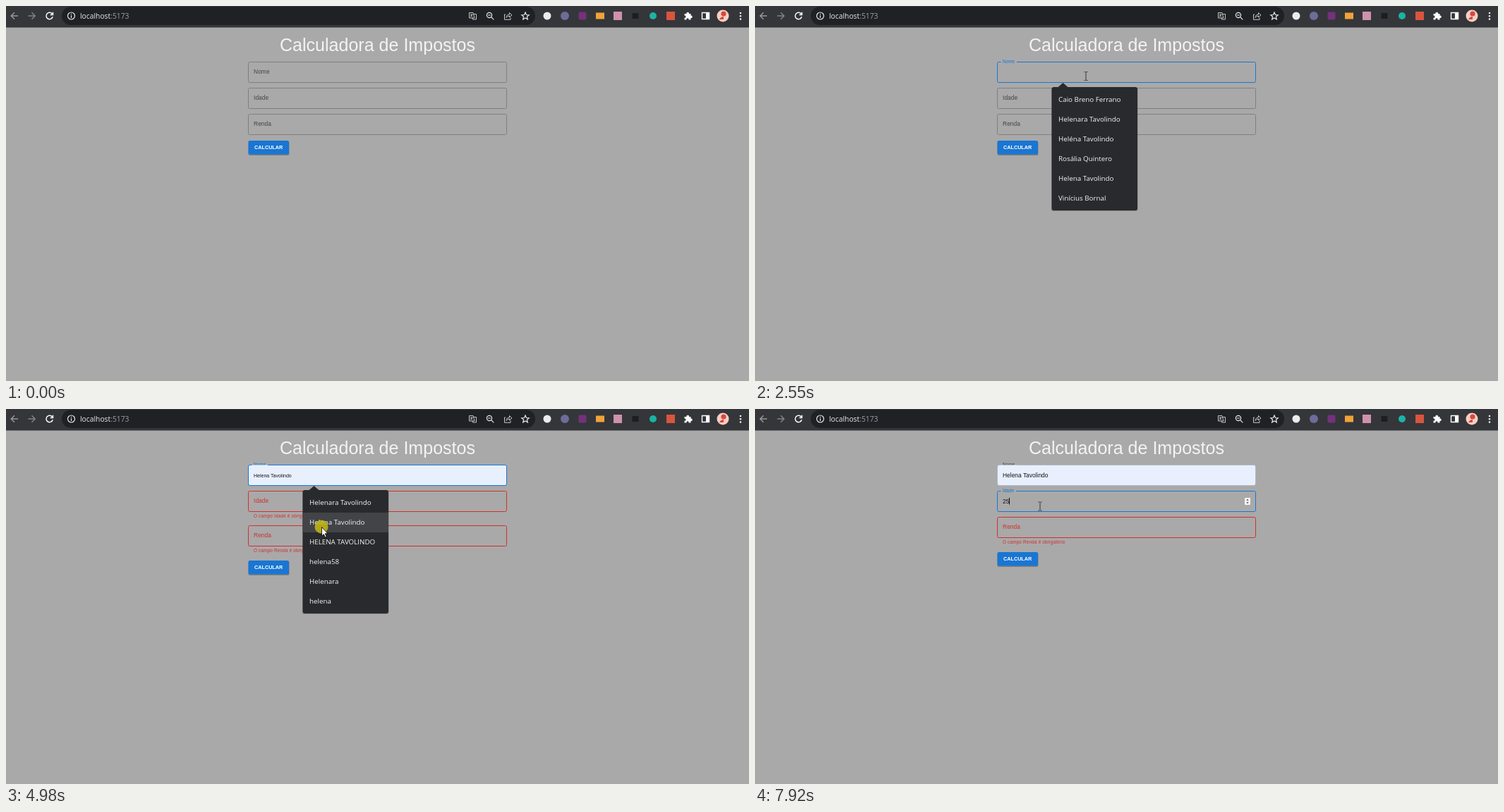
An HTML page for the animation above (8000 ms loop, 1053 by 532 pixels).

```html
<!DOCTYPE html>
<html lang="pt">
<head>
<meta charset="utf-8">
<title>Calculadora de Impostos</title>
<style>
html, body { margin: 0; width: 100%; height: 100%; overflow: hidden; background: #a9a9a9; }
svg { display: block; }
text { white-space: pre; font-family: "Liberation Sans", Arial, sans-serif; }
.ui { font-family: "Open Sans", "Noto Sans", sans-serif; }
.line { fill: none; stroke: #e8eaed; stroke-width: 1.2; }
</style>
</head>
<body>
<svg width="1053" height="532" viewBox="0 0 1053 532">
  <rect width="1053" height="532" fill="#a9a9a9"/>
  <rect width="1053" height="30.5" fill="#35363a"/>
  <rect x="79" y="1" width="671" height="26" rx="13" fill="#202124"/>
  <g class="line">
    <g stroke-width="1.5">
      <path d="M17 14H7.5M12 9.3 7.3 14 12 18.7" style="stroke:#96979a"/>
      <path d="M31.500 14H41M36.500 9.300 41.200 14 36.500 18.700" style="stroke:#818285"/>
      <path d="M65.700 11.500A4.700 4.700 0 1 0 66.200 15.300M66.500 8.800V12.400H62.800" stroke="#fff"/>
    </g>
    <circle cx="92.500" cy="14" r="5"/>
    <path d="M92.500 13.300V17M92.500 11V12.200"/>
    <path d="M656.500 9.500H662L664 17H656.500ZM663 11.500H666.500V19H661.500L661 17M658 12H661.500M660.500 12Q660 14.500 658 15.500M658.500 13 661 15.500" stroke-width="1" style="stroke:#c4c7c5"/>
    <circle cx="685" cy="13" r="3.600"/>
    <path d="M687.700 15.700 691.300 19.300M683 13H687"/>
    <path d="M708 12H706.500V19.300H715V16.500M709 16.500Q709.300 12 713.500 12V9.500L717 13 713.500 16V14Q710.500 14 709 16.500Z" stroke-width="1" style="stroke:#c4c7c5"/>
    <path d="M736 9 737.500 12.500 741.200 12.800 738.400 15.200 739.300 19 736 17 732.700 19 733.600 15.200 730.800 12.800 734.500 12.500Z"/>
    <path d="M986.500 9.500H996.500V18.500H986.500Z" stroke-width="1.400" style="stroke:#fff"/>
  </g>
  <rect x="992" y="9" width="5" height="10" fill="#fff"/>
  <circle cx="767" cy="14" r="5.500" fill="#ececec"/>
  <circle cx="792" cy="14" r="6" fill="#6e6c98"/>
  <rect x="811.500" y="8.500" width="11" height="11" rx="2" fill="#74317c"/>
  <rect x="836" y="9.500" width="12" height="9" fill="#f1a33a"/>
  <rect x="861" y="8" width="12" height="12" fill="#cf91ae"/>
  <rect x="887.500" y="10" width="9" height="8" fill="#1d1e20"/>
  <circle cx="917" cy="14" r="5" fill="#1cb3a5"/>
  <rect x="936" y="8" width="12" height="12" fill="#d9553f"/>
  <path d="M961.500 11H964.500A1.800 1.800 0 1 1 968 11H970.500V13.500A1.800 1.800 0 1 1 970.500 17V19.500H967.500A1.600 1.600 0 1 0 964.500 19.500H961.500V16.700A1.600 1.600 0 1 0 961.500 13.600Z" fill="#fff"/>
  <circle cx="1016" cy="14" r="8.500" fill="#f7cfc5"/>
  <circle cx="1017" cy="11" r="3.600" fill="#d9483b"/>
  <path d="M1011 19Q1013 15 1017 15V19Z" fill="#d9483b"/>
  <g fill="#e8eaed"><circle cx="1041" cy="10" r="1.300"/><circle cx="1041" cy="14.300" r="1.300"/><circle cx="1041" cy="18.600" r="1.300"/></g>
  <text class="ui" x="105" y="18" font-size="10.300" fill="#e8eaed">localhost<tspan fill="#9aa0a6">:5173</tspan></text>
  <text x="526.500" y="64" font-size="25.050" text-anchor="middle" fill="#f3f3f3">Calculadora de Impostos</text>
  <g id="live"></g>
</svg>
<script>
const LOOP = 8000, EM = 8.43, GREY = '#7f7f7f', RED = '#d32f2f', BLUE = '#1976d2';
const live = document.getElementById('live');
const pen = document.createElement('canvas').getContext('2d');
pen.font = '100px "Liberation Sans", Arial, sans-serif';
const widthOf = (s, size) => pen.measureText(s).width * size / 100;
const clamp = v => Math.max(0, Math.min(1, v));
const mix = (a, b, u) => a + (b - a) * u;
const within = (t, ...spans) => spans.some(([a, b]) => t >= a && t < b);
const latest = (list, t) => list.reduce((v, [at, x]) => t >= at ? x : v, list[0][1]);

// time, x, y of the pointer
const path = [
  [210, 1016, 520], [480, 735, 352], [680, 512, 178], [750, 486, 131], [820, 476, 112], [890, 476, 109],
  [1030, 475, 106], [1290, 469, 99.5], [4280, 469, 99.5], [4350, 466, 112], [4480, 458, 140],
  [4620, 450, 168], [4700, 447, 180], [4830, 446, 172], [4980, 447, 167], [5110, 447, 167],
  [5320, 449, 167.5], [5450, 445, 160], [5790, 404, 137.5], [6920, 404, 138], [LOOP, 404, 138]
];
const typed = [[0, ''], [2750, 'h'], [2820, 'he'], [3170, 'hel'], [3350, 'hele'], [3620, 'helen'],
  [3750, 'helena'], [5110, 'Helena Tavolindo']];
const age = [[0, ''], [7580, '2'], [7920, '25']];
const found = ['Helenara Tavolindo', 'Helena Tavolindo', 'HELENA TAVOLINDO', 'helena58'];
const lists = [
  [2550, ['Caio Breno Ferrano', 'Helenara Tavolindo', 'Heléna Tavolindo', 'Rosália Quintero', 'Helena Tavolindo', 'Vinícius Bornal']],
  [2890, [...found, 'Heleno Quartim', 'Helena Bornal']],
  [3750, [...found, 'Helenara', 'helena']]
];

function pointerAt(t) {
  const i = path.findLastIndex(k => t >= k[0]);
  if (i < 0) return null;
  const [t0, x0, y0] = path[i], [t1, x1, y1] = path[i + 1] || path[i];
  const u = t1 > t0 ? clamp(Math.floor((t - t0) / 67 + .05) * 67 / (t1 - t0)) : 0;
  return { x: mix(x0, x1, u), y: mix(y0, y1, u) };
}

const text = (x, y, size, fill, s, extra = '') =>
  `<text x="${x}" y="${y}" font-size="${size}" fill="${fill}" ${extra}>${s}</text>`;

function spinner(cy) {
  return `<rect x="694" y="${cy - 5}" width="8" height="10" rx="1" fill="#f4f4f4"/>
    <path d="M696.300 ${cy - 1.3}h3.400l-1.700-2zM696.300 ${cy + 1.3}h3.400l-1.700 2z" fill="#444"/>`;
}

function field(f) {
  const { y, shrink = 0, value = '', size = EM } = f;
  const gap = f.gap * clamp(shrink * 2), ease = 1 - (1 - shrink) ** 2;
  const stroke = f.error ? RED : f.focus ? BLUE : f.fill ? '#b3bac6' : f.hover ? '#202020' : GREY;
  const ink = f.error ? RED : f.focus ? BLUE : '#454545';
  let s = text(351, mix(y + 16.2, y + 1, ease), mix(EM, EM * .75, ease), ink, f.label, 'letter-spacing=".05"');
  if (f.fill) s += `<rect x="344" y="${y}" width="365" height="28.500" rx="2" fill="#e8f0fe"/>`;
  s += `<path fill="none" stroke="${stroke}" d="M${348.5 + gap} ${y}H707.500a2 2 0 0 1 2 2v25a2 2 0 0 1-2 2H345.500a2 2 0 0 1-2-2v-25a2 2 0 0 1 2-2H348.500"/>`;
  if (value) s += text(351, y + 17, size, '#161616', value);
  if (f.caret) {
    const x = Math.round(351 + widthOf(value, size));
    s += `<rect x="${x}" y="${y + 9.5}" width="1" height="9.500" fill="#111"/>`;
  }
  if (f.spin) s += spinner(y + 14.5);
  if (f.error && !f.quiet) s += text(351, y + 37.7, 6.32, RED, `O campo ${f.label} é obrigatório`, 'letter-spacing=".21"');
  return s;
}

function button(y) {
  return `<rect x="343.500" y="${y + 1}" width="58" height="20" rx="2" fill="#000" opacity=".25"/>
    <rect x="343.500" y="${y}" width="57.500" height="19.500" rx="2" fill="${BLUE}"/>` +
    text(352, y + 11.6, 7.25, '#fff', 'CALCULAR', 'font-weight="700"');
}

function popup(rows, hot) {
  let s = `<rect x="420" y="116" width="122.500" height="175" rx="3" fill="#000" opacity=".22"/>
    <path d="M429 115.500 436.500 109 444 115.500Z" fill="#292a2d"/>
    <rect x="420.500" y="115" width="121.500" height="175" rx="3" fill="#292a2d"/>`;
  if (hot >= 0) s += `<rect x="420.500" y="${119 + hot * 28}" width="121.500" height="28" fill="#434447"/>`;
  rows.forEach((r, i) => s += text(430, 136.4 + i * 28, 9.8, '#f5f5f5', r, 'class="ui"'));
  return s;
}

function cursor(p, beam) {
  const at = `transform="translate(${p.x} ${p.y})"`;
  return beam
    ? `<path ${at} d="M-2.500-6H-.5M.5-6H2.500M0-5.500V5.500M-2.500 6H-.5M.5 6H2.500" fill="none" stroke="#333"/>`
    : `<path ${at} d="M.5.5V13.200L3.300 10.600 5.300 15 7.300 14.100 5.300 9.800H9Z" fill="#fff" stroke="#111" stroke-width=".9"/>`;
}

function scene(t) {
  const p = pointerAt(t);
  const open = within(t, [2550, 5110]);
  const ageError = within(t, [2890, 7580]), incomeError = t >= 2890;
  const incomeY = ageError ? 165.5 : 153.5;
  const inPopup = open && p.x > 420 && p.x < 542 && p.y > 112;
  const over = y => !!p && !inPopup && p.x > 343 && p.x < 710 && p.y > y && p.y < y + 29;
  const hot = inPopup && p.y >= 119 ? Math.floor((p.y - 119) / 28) : -1;
  const rows = latest(lists, t);
  const [h1, h2, h3] = [79.5, 116.5, incomeY].map(over);
  const ageFocus = t >= 5970;

  let s = field({
    y: 79.5, label: 'Nome', gap: 22.5, shrink: clamp((t - 1500) / 200), hover: h1,
    focus: within(t, [1500, 5970]), fill: hot >= 0 || t >= 5110,
    value: hot >= 0 ? rows[hot] : latest(typed, t), size: hot >= 0 ? 7.03 : EM,
    caret: within(t, [1560, 2090], [2610, 4280], [5110, 5640])
  });
  s += field({
    y: 116.5, label: 'Idade', gap: 21.5, shrink: clamp((t - 5970) / 200), hover: h2,
    focus: ageFocus, error: ageError, value: latest(age, t), spin: h2 || ageFocus,
    caret: within(t, [5970, 6520], [7050, LOOP])
  });
  s += field({ y: incomeY, label: 'Renda', gap: 0, hover: h3, error: incomeError, spin: h3 });
  s += button(191 + (ageError ? 12 : 0) + (incomeError ? 12 : 0));
  if (open) s += popup(rows, hot);
  if (p) {
    if (within(t, [1500, 1630], [4980, 5110], [5970, 6100]))
      s += `<circle cx="${p.x}" cy="${p.y}" r="9.500" fill="#c3b914" opacity=".85"/>`;
    s += cursor(p, h1 || h2 || h3);
  }
  return s;
}

let shown = '';
const start = performance.now();
function frame() {
  const next = scene((performance.now() - start) % LOOP);
  if (next !== shown) live.innerHTML = shown = next;
  requestAnimationFrame(frame);
}
frame();
</script>
</body>
</html>
```
